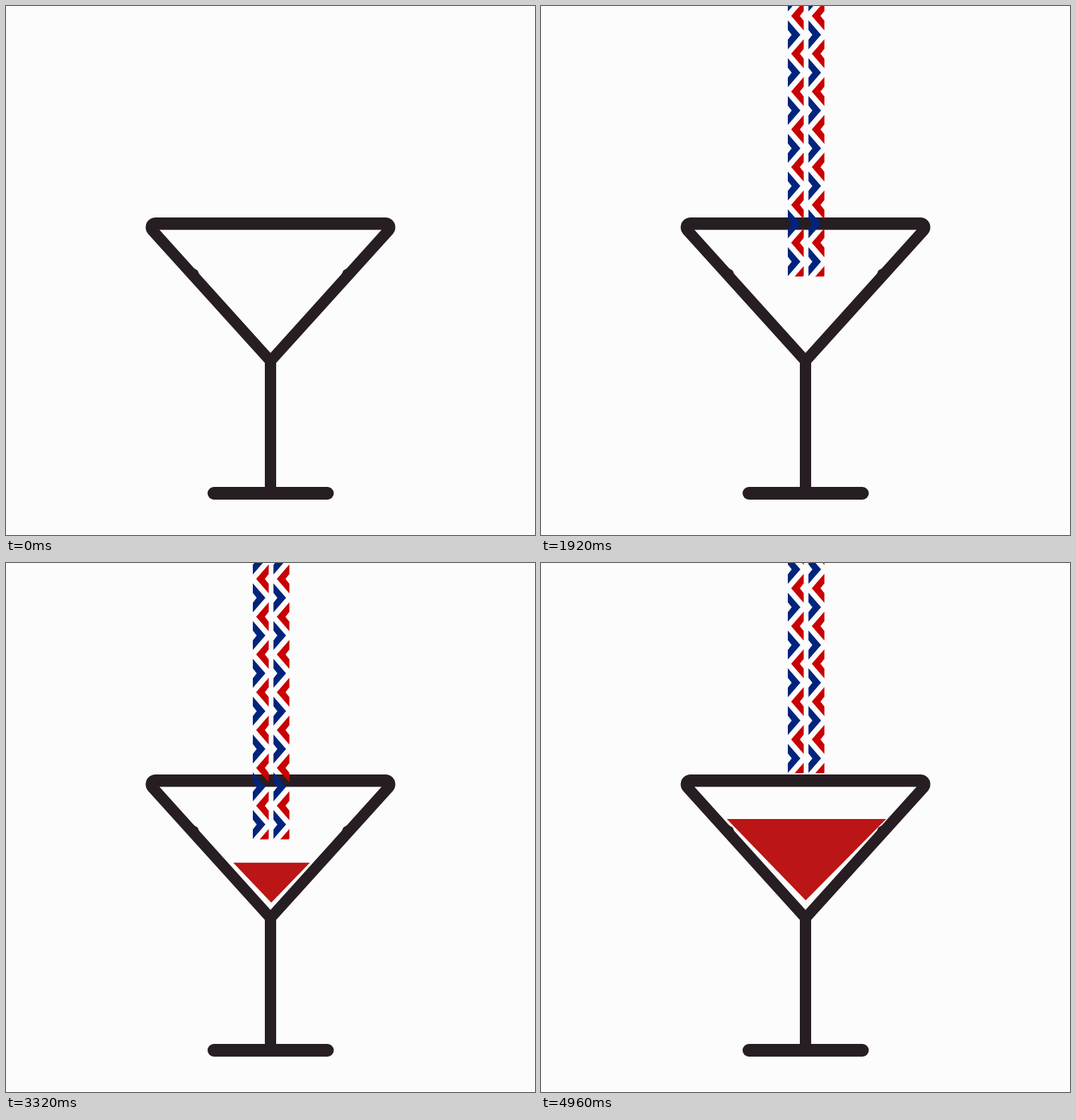
These frames come from a looping animation (748x748 px, 5 s). An HTML page with a canvas:

```html
<!DOCTYPE html>
<html lang="en">
<head>
<meta charset="utf-8">
<title>Filling glass</title>
<style>
  html, body { margin: 0; width: 100%; height: 100%; overflow: hidden; background: #fcfcfc; }
  canvas { display: block; }
</style>
</head>
<body>
<canvas id="stage" width="748" height="748"></canvas>
<script>
const ctx = document.getElementById('stage').getContext('2d');
const SIZE = 748, LOOP = 5000, STEP = 40;
const PERIOD = 53.45, COLUMN = 22.5;
const INK = '#261e23', BLUE = '#00247d', RED = '#c80003', DRINK = '#bb1515';

const POUR_START = 2120;
// Time and height of the stream's lower end
const STREAM = [[0, -6], [2272, 453.7], [2880, 417.3], [3800, 362], [5000, 295]];

function between(keys, t) {
  const i = keys.findIndex(key => key[0] > t);
  const [t0, v0] = keys[i - 1], [t1, v1] = keys[i];
  return v0 + (v1 - v0) * (t - t0) / (t1 - t0);
}

function polygon(color, points) {
  ctx.fillStyle = color;
  ctx.beginPath();
  points.forEach(([x, y]) => ctx.lineTo(x, y));
  ctx.closePath();
  ctx.fill();
}

function drawGlass() {
  ctx.fillStyle = INK;
  ctx.beginPath();
  // Outer bowl, round corners of radius 14
  const tilt = Math.atan2(157, -174);
  ctx.moveTo(374, 513.5);
  ctx.arc(211.5, 313, 14, tilt, Math.PI * 1.5);
  ctx.arc(536.5, 313, 14, -Math.PI / 2, Math.PI - tilt);
  ctx.closePath();
  // Opening
  ctx.moveTo(217, 316.5);
  ctx.lineTo(531, 316.5);
  ctx.lineTo(374, 490.5);
  ctx.closePath();
  ctx.fill('evenodd');

  ctx.fillRect(366, 503, 16, 180);
  ctx.beginPath();
  ctx.roundRect(285, 680, 178.5, 18, 9);
  ctx.fill();

  for (const side of [-1, 1]) {
    polygon(INK, [[108, 371], [103, 374], [100, 381], [104, 381]]
      .map(([x, y]) => [374 + side * x, y]));
  }
}

function chevron(color, x, y, dir) {
  polygon(color, [
    [x, y - 20.5], [x + dir * 17.8, y], [x, y + 20.5],
    [x, y + 7], [x + dir * 5.5, y], [x, y - 7]
  ]);
}

function drawStream(t) {
  const end = between(STREAM, t);
  if (end <= 0) return;
  ctx.save();
  ctx.beginPath();
  ctx.rect(349, 0, 52, end);
  ctx.clip();
  for (const x of [349, 378.2]) {
    for (let y = end - 21; y > -PERIOD; y -= PERIOD) {
      chevron(BLUE, x, y, 1);
      chevron(RED, x + COLUMN, y + PERIOD / 2, -1);
    }
  }
  ctx.restore();
}

function drawDrink(t) {
  if (t < POUR_START) return;
  const dt = t - 2880;
  const top = 440.5 - 0.0378 * dt;
  polygon(DRINK, [
    [337 - 0.0357 * dt, top],
    [414 + 0.0356 * dt, top],
    [375.3 - 0.0005 * dt, 481 - 0.0019 * dt]
  ]);
}

function render(now) {
  const t = Math.floor((now % LOOP) / STEP) * STEP;
  ctx.fillStyle = '#fcfcfc';
  ctx.fillRect(0, 0, SIZE, SIZE);
  drawGlass();
  drawDrink(t);
  drawStream(t);
}

let start;
function tick(now) {
  start ??= now;
  render(now - start);
  requestAnimationFrame(tick);
}
render(0);
requestAnimationFrame(tick);
</script>
</body>
</html>
```
